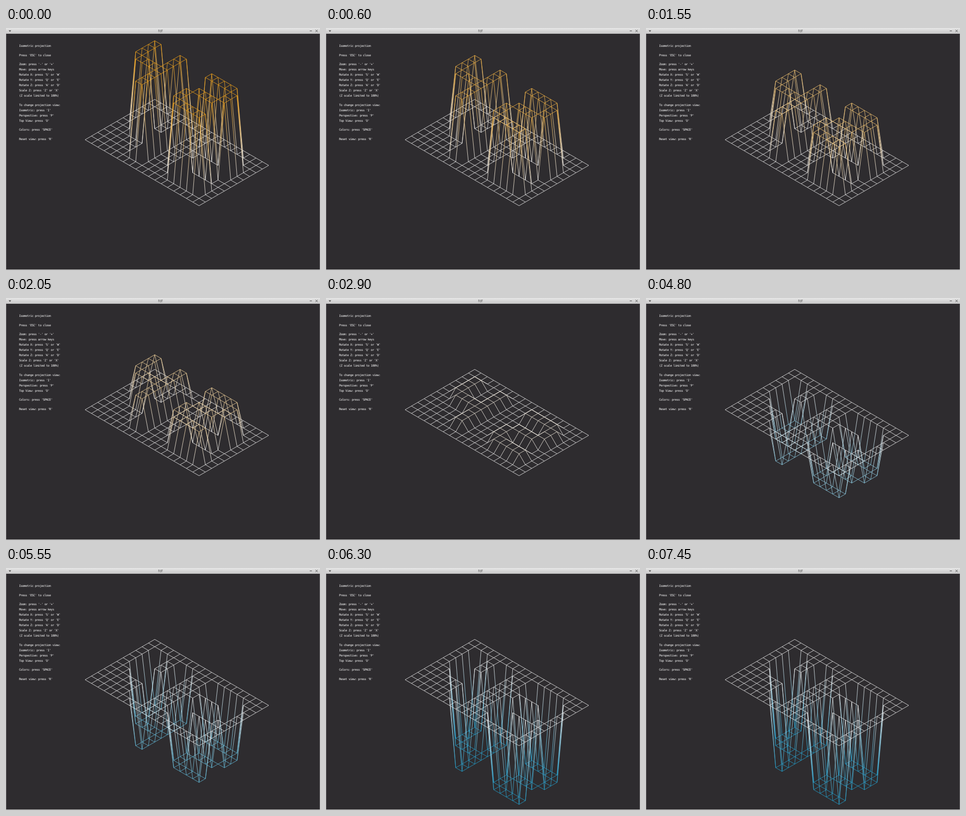
An HTML page with a canvas for the animation above (7.5 s loop, 600x462 px).

```html
<!DOCTYPE html>
<html>
<head>
<meta charset="utf-8">
<style>
  html, body { margin: 0; width: 100%; height: 100%; overflow: hidden; background: #2e2c2f; }
  canvas { display: block; }
</style>
</head>
<body>
<canvas id="stage" width="600" height="462"></canvas>
<script>
const ctx = document.getElementById('stage').getContext('2d');
const LOOP = 7500, COLS = 19, ROWS = 12, MAX_Z = 140, STEP_Z = 14;

// Times at which the height scale drops by one step
const DROPS = [300, 600, 950, 1300, 1650, 2000, 2300, 2600, 2850, 3150,
  3500, 3750, 4100, 4450, 4750, 5000, 5250, 5600, 5900, 6300];

const MAP = [
  '', '',
  '..##..##...#####',
  '..##..##...######',
  '..##..##.......##',
  '..######....#####',
  '...#####...#####',
  '......##...##',
  '......##...######',
  '......##....#####',
  '', ''
];

const HELP = [
  [34, 'Isometric projection'],
  [51.5, "Press 'ESC' to close"],
  [69, "Zoom: press '-' or '+'", 'Move: press arrow keys', "Rotate X: press 'S' or 'W'",
    "Rotate Y: press 'Q' or 'E'", "Rotate Z: press 'A' or 'D'", "Scale Z: press 'Z' or 'X'",
    '(Z scale limited to 100%)'],
  [146.5, 'To change projection view:', "Isometric: press 'I'", "Perspective: press 'P'",
    "Top View: press 'O'"],
  [194, "Colors: press 'SPACE'"],
  [211.5, "Reset view: press 'R'"]
];

const WHITE = [242, 242, 242], ORANGE = [245, 165, 25], BLUE = [35, 160, 205];

function heightColor(z) {
  const end = z > 0 ? ORANGE : BLUE, k = Math.abs(z) / MAX_Z;
  return `rgb(${WHITE.map((c, i) => Math.round(c + (end[i] - c) * k))})`;
}

function project(col, row, scale) {
  const z = MAP[row][col] === '#' ? scale : 0;
  return { x: 284.2 + 12.1 * (col - row), y: 136.3 + 7 * (col + row) - z, z };
}

function drawEdge(a, b) {
  if (a.z === b.z) {
    ctx.strokeStyle = heightColor(a.z);
  } else {
    const fade = ctx.createLinearGradient(a.x, a.y, b.x, b.y);
    fade.addColorStop(0, heightColor(a.z));
    fade.addColorStop(1, heightColor(b.z));
    ctx.strokeStyle = fade;
  }
  ctx.beginPath();
  ctx.moveTo(a.x, a.y);
  ctx.lineTo(b.x, b.y);
  ctx.stroke();
}

function drawMesh(scale) {
  ctx.lineWidth = 0.8;
  for (let row = 0; row < ROWS; row++) {
    for (let col = 0; col < COLS; col++) {
      const p = project(col, row, scale);
      if (col + 1 < COLS) drawEdge(p, project(col + 1, row, scale));
      if (row + 1 < ROWS) drawEdge(p, project(col, row + 1, scale));
    }
  }
}

function drawHelp() {
  ctx.font = '5.8px "DejaVu Sans Mono", monospace';
  ctx.letterSpacing = '-0.46px';
  ctx.textAlign = 'left';
  ctx.fillStyle = '#fff';
  for (const [top, ...lines] of HELP) {
    lines.forEach((line, i) => ctx.fillText(line, 25, top + 2.2 + i * 10));
  }
}

function drawWindow() {
  ctx.fillStyle = '#2e2c2f';
  ctx.fillRect(0, 0, 600, 462);
  const bar = ctx.createLinearGradient(0, 0, 0, 11);
  bar.addColorStop(0, '#e6e6e6');
  bar.addColorStop(1, '#c6c6c6');
  ctx.fillStyle = bar;
  ctx.fillRect(0, 0, 600, 11);
  ctx.fillStyle = '#8a898b';
  ctx.fillRect(0, 11, 0.6, 451);
  ctx.fillRect(599.4, 11, 0.6, 451);
  ctx.fillStyle = '#c4c4c4';
  ctx.fillRect(0, 461, 600, 1);

  ctx.fillStyle = '#4a4a4a';
  ctx.font = '6.5px "Open Sans", sans-serif';
  ctx.letterSpacing = '0px';
  ctx.textAlign = 'center';
  ctx.fillText('fdf', 295, 8);
  ctx.fill(new Path2D('M5 4.5h5l-2.5 2.8z'));
  ctx.strokeStyle = '#4a4a4a';
  ctx.lineWidth = 1;
  ctx.stroke(new Path2D('M580.5 5.5h4M591.5 3.5l4 4m0-4l-4 4'));
}

function render() {
  const time = performance.now() % LOOP;
  const drops = DROPS.filter(t => t <= time).length;
  drawWindow();
  drawHelp();
  drawMesh(MAX_Z - STEP_Z * drops);
  requestAnimationFrame(render);
}
render();
</script>
</body>
</html>
```
